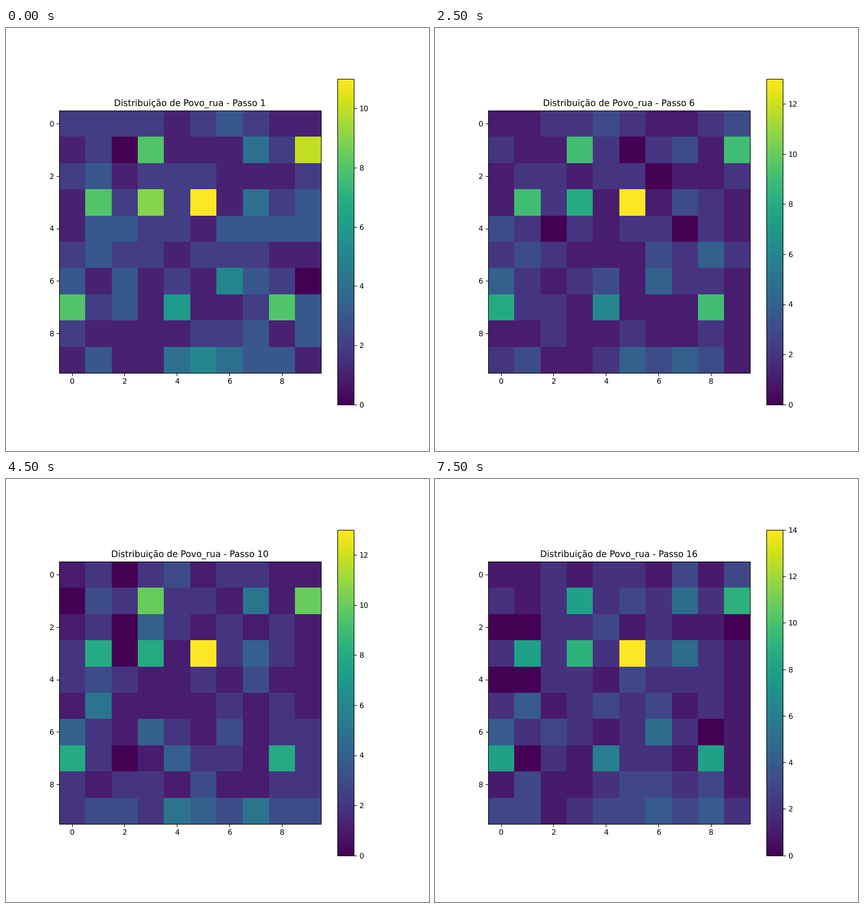
Write a matplotlib script that moves like this. It is 748 px wide and 748 px high and loops after 8000 ms.

```python
import matplotlib.pyplot as plt
import numpy as np
from matplotlib.animation import FuncAnimation

SIZE = 10
INTERVAL = 500
BACKGROUND = 1.7
SPREAD = 0.8

# The busiest cell, step by step, sets the colour scale.
BUSIEST = (3, 5)
TOP = [11, 12, 11, 12, 13, 13, 12, 11, 13, 13, 12, 12, 13, 12, 12, 14]

# Gathering points and their usual crowd.
SITES = {
    (1, 3): 8, (1, 9): 9, (3, 1): 8.6, (3, 3): 8.2, (7, 0): 8.3, (7, 8): 8.1,
    (7, 4): 5, (1, 7): 4, (3, 7): 4, (5, 1): 4, (6, 0): 3.5, (6, 6): 3.5,
}


def usual_crowd():
    grid = np.full((SIZE, SIZE), BACKGROUND)
    grid[-1, 4:9] = 3.7
    for cell, level in SITES.items():
        grid[cell] = level
    return grid


def crowd(i):
    """People per cell: the usual level plus seeded wandering."""
    rng = np.random.default_rng(i)
    wander = rng.normal(0, SPREAD, (SIZE, SIZE))
    grid = np.rint(usual_crowd() + wander).clip(0, TOP[i] - 1)
    grid[BUSIEST] = TOP[i]
    return grid


plt.rcParams["text.hinting"] = "none"
fig, ax = plt.subplots(figsize=(8, 8), dpi=93.5)
image = ax.imshow(crowd(0), cmap="viridis", vmin=0, vmax=TOP[0])
fig.colorbar(image, ax=ax)
title = ax.set_title("")


def update(i):
    image.set_data(crowd(i))
    image.set_clim(0, TOP[i])
    title.set_text(f"Distribuição de Povo_rua - Passo {i + 1}")
    return image, title


anim = FuncAnimation(fig, update, frames=len(TOP), interval=INTERVAL,
                     repeat=True, repeat_delay=0)
plt.show()
```
